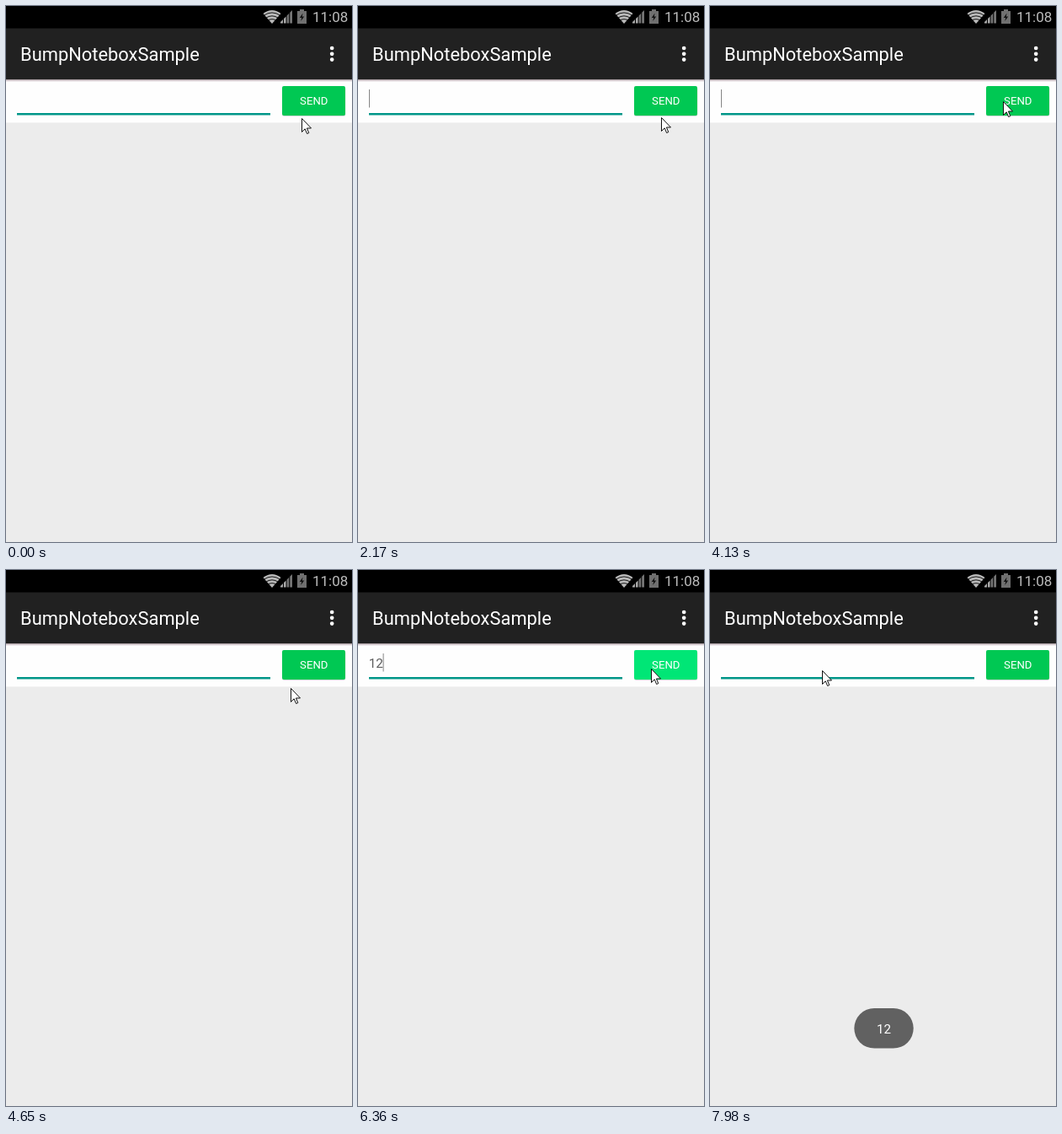
Write an HTML page that moves like this. It is 411x636 px and loops after 8000 ms.

```html
<!DOCTYPE html>
<html lang="en">
<head>
<meta charset="utf-8">
<title>Send button</title>
<style>
  html, body { margin: 0; width: 100%; height: 100%; overflow: hidden; background: #ececec; }
  svg { display: block; width: 411px; height: 636px; font-family: Roboto, "Noto Sans", sans-serif; }
</style>
</head>
<body>
<svg viewBox="0 0 411 636">
  <defs>
    <linearGradient id="shade" x1="0" y1="0" x2="0" y2="1">
      <stop offset="0" stop-color="#8f8488"/>
      <stop offset=".5" stop-color="#e6dce0"/>
      <stop offset="1" stop-color="#fefefe"/>
    </linearGradient>
    <clipPath id="face"><rect x="328" y="95" width="75" height="35" rx="2"/></clipPath>
  </defs>

  <rect width="411" height="636" fill="#ececec"/>
  <rect y="87" width="411" height="51.5" fill="#fefefe"/>
  <rect y="87" width="411" height="3.5" fill="url(#shade)"/>
  <rect y="26" width="411" height="61" fill="#212121"/>
  <rect width="411" height="26.5"/>

  <!-- status icons -->
  <path d="M305.5 9Q316 1 326.5 9L316 21Z" fill="#b9b9b9"/>
  <path d="M306 11.4Q316 4.4 326 11.4M308 14.6Q316 9 324 14.6M310 17.6Q316 13.6 322 17.6" fill="none" stroke="#000" stroke-width=".9"/>
  <g fill="#a8a8a8">
    <path d="M326 20.5V19L329 16V20.5ZM330 20.5V15L332.6 12.4V20.5Z"/>
    <path d="M333.6 20.5V11.4L336.2 8.8V20.5ZM337.2 20.5V7.8L340 5V20.5Z" fill="#757575"/>
  </g>
  <path d="M349 4H354V6H357V21H346V6H349Z" fill="#707070"/>
  <path d="M352.6 8.5L348.8 14H351.2L350.2 18L354.2 12.6H351.8Z" fill="#111"/>
  <text x="364" y="19.3" font-size="17" fill="#bcbcbc">11:08</text>

  <!-- app bar -->
  <text x="17" y="65.3" font-size="21.9" fill="#fff">BumpNoteboxSample</text>
  <path d="M387.2 50v0M387.2 56.8v0M387.2 63.6v0" stroke="#fff" stroke-width="4.7" stroke-linecap="round"/>

  <!-- input row -->
  <rect x="13" y="127" width="301" height="2.5" fill="#009688"/>
  <text id="entry" x="12.7" y="116.3" font-size="15.4" fill="#5c5c5c"></text>
  <rect id="caret" y="99" width="1" height="21.5" fill="#858585"/>

  <g id="button">
    <rect x="328" y="96" width="75.3" height="34.7" rx="2.5" fill="#000" opacity=".2"/>
    <rect id="plate" x="328" y="95" width="75" height="35" rx="2"/>
    <g clip-path="url(#face)" font-size="13.2" fill="#fff" text-anchor="middle">
      <text id="send" x="365.8" y="117.2">SEND</text>
      <text id="done" x="365.8" y="117.2">√</text>
    </g>
  </g>

  <g id="toast">
    <rect x="171.3" y="520" width="70.4" height="47.6" rx="23.8" fill="#616161"/>
    <text x="206.5" y="550" font-size="15.2" fill="#fff" text-anchor="middle">12</text>
  </g>

  <path id="pointer" d="M.5 .5V16.5L4.2 12.8L6.6 18.5L8.8 17.6L6.4 12H11.5Z" fill="#fff" stroke="#111"/>
</svg>

<script>
const LOOP = 8000;
const STEP = 145; // screen refresh
const MESSAGE = "12";
const TYPE_AT = 5075, SEND_AT = 6350, RESET_AT = 7560;
const clicks = [1160, 2680, 3805, 6205];

// pointer stops: time, x, y
const stops = [
  [0, 351, 133], [710, 355, 117], [1150, 355, 117], [1450, 359, 138], [2170, 360, 131],
  [2900, 358, 114], [4060, 348, 113], [4785, 336, 147], [5365, 116, 120],
  [6205, 352, 116], [6815, 262, 139], [7975, 133, 119]
];

const el = id => document.getElementById(id);
const set = (id, name, value) => el(id).setAttribute(name, value);
const move = (id, x, y) => set(id, "transform", `translate(${x} ${y})`);
const ramp = (t, start, length) => Math.max(0, Math.min(1, (t - start) / length));
const mix = (a, b, k) => a + (b - a) * k;

function pointerAt(t) {
  const i = stops.findLastIndex(s => s[0] <= t);
  const from = stops[i], to = stops[i + 1] || from;
  const k = ramp(t, from[0], to[0] - from[0] || 1);
  return [1, 2].map(n => Math.round(mix(from[n], to[n], k)));
}

// two quick swings for an empty message
function shake(age) {
  const k = ramp(age, 30, 300);
  return 1.5 * Math.sin(k * 4 * Math.PI);
}

function slide(id, y, alpha) {
  move(id, 0, y);
  set(id, "opacity", alpha);
}

function draw(time) {
  const t = Math.floor(time / STEP) * STEP;

  const typed = t < SEND_AT ? MESSAGE.slice(0, Math.max(0, (t - TYPE_AT) / STEP)) : "";
  el("entry").textContent = typed;
  set("caret", "x", 13 + typed.length * 8.3);
  set("caret", "opacity", (time + LOOP - 130) % 1000 < 500 ? 1 : 0);

  const click = clicks.findLast(c => c <= t);
  const age = t - click;
  set("plate", "fill", age < STEP ? "#00e676" : "#00c853");
  move("button", click < TYPE_AT ? shake(age) : 0, 0);

  const sent = ramp(t, SEND_AT, 300) - ramp(t, RESET_AT, 260);
  slide("send", -28 * sent, 1 - sent);
  slide("done", 28 * (1 - sent), sent);

  set("toast", "opacity", Math.sin(ramp(t, SEND_AT + 130, 450) * Math.PI / 2));
  move("pointer", ...pointerAt(t));
}

const begin = performance.now();
function loop() {
  draw((performance.now() - begin) % LOOP);
  requestAnimationFrame(loop);
}
loop();
</script>
</body>
</html>
```
